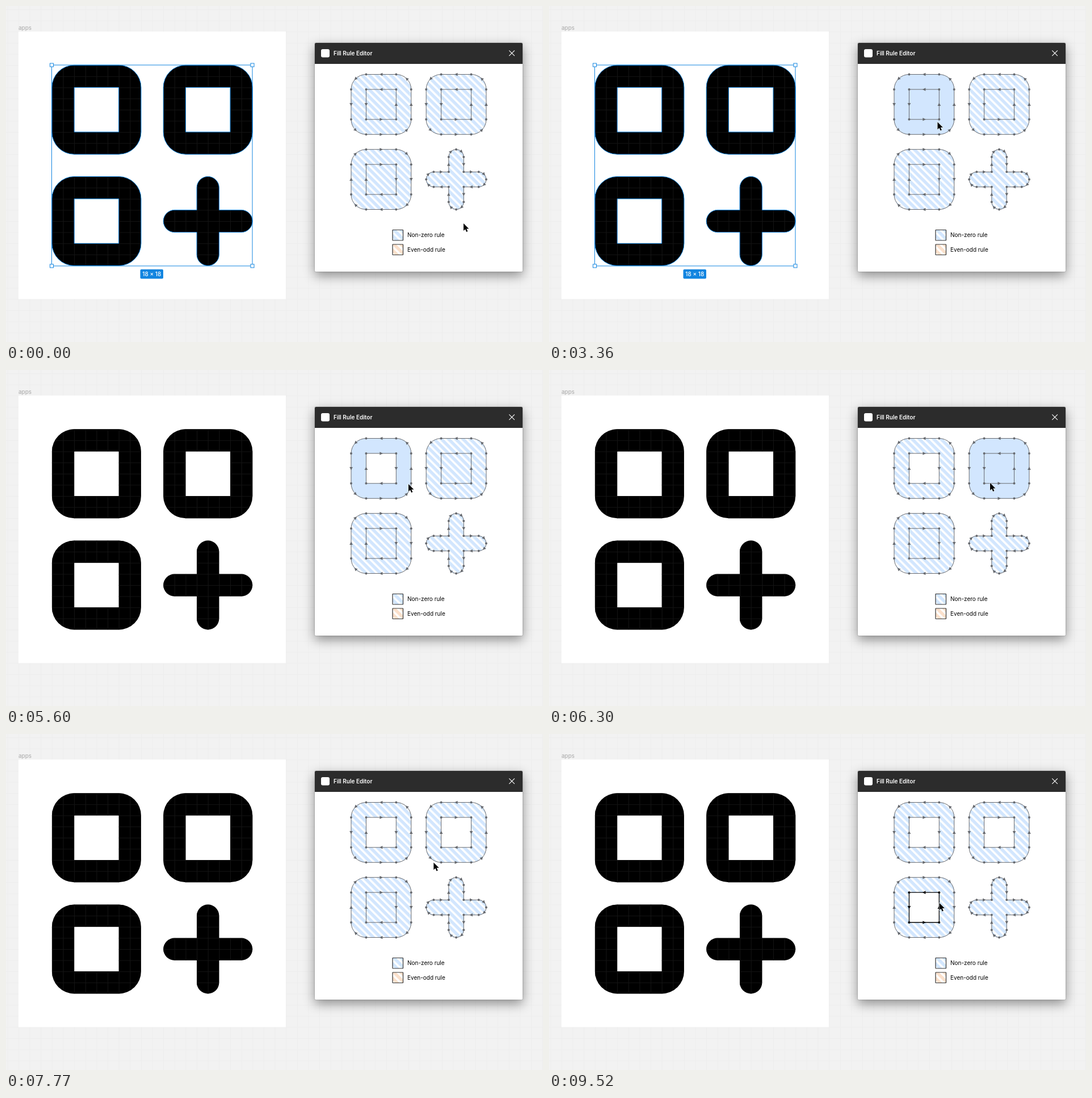
An HTML page for the animation above (9590 ms loop, 946 px wide and 592 px high).

```html
<!DOCTYPE html>
<html lang="en">
<head>
<meta charset="utf-8">
<title>Fill Rule Editor</title>
<style>
  html, body { margin: 0; width: 100%; height: 100%; overflow: hidden; background: #f2f2f2; }
  svg { display: block; width: 946px; height: 592px; }
  text { font: 10px Inter, "Liberation Sans", sans-serif; }
  .panel { filter: drop-shadow(0 0 1px rgba(0,0,0,.3)) drop-shadow(0 7px 10px rgba(0,0,0,.42)); }
  .sel { fill: none; stroke: #1285e0; stroke-width: 1; }
</style>
</head>
<body>
<svg viewBox="0 0 946 592">
  <defs>
    <pattern id="grid" x="22" y="45.3" width="19.63" height="19.63" patternUnits="userSpaceOnUse">
      <path d="M0 .5H20M.5 0V20" stroke="#ededed" fill="none"/>
    </pattern>
    <pattern id="gridDark" x="22" y="45.3" width="19.63" height="19.63" patternUnits="userSpaceOnUse">
      <path d="M0 .5H20M.5 0V20" stroke="#141414" fill="none"/>
    </pattern>
    <pattern id="blue" width="9" height="9" patternUnits="userSpaceOnUse" patternTransform="rotate(45)">
      <rect width="9" height="9" fill="#fff"/><rect width="9" height="5.5" fill="#d2e6fe"/>
    </pattern>
    <pattern id="orange" width="9" height="9" patternUnits="userSpaceOnUse" patternTransform="rotate(45)">
      <rect width="9" height="9" fill="#fff"/><rect width="9" height="5.5" fill="#fbe0cb"/>
    </pattern>
  </defs>

  <rect width="946" height="592" fill="#f2f2f2"/>
  <rect width="946" height="592" fill="url(#grid)"/>
  <text x="22" y="41.5" fill="#a9a9a9">apps</text>
  <rect x="22" y="45" width="471" height="471.5" fill="#fff"/>
  <g id="icon"></g>
  <g id="selection">
    <g id="outline" class="sel"></g>
    <rect class="sel" x="80.5" y="104" width="353.5" height="354"/>
    <g id="handles" fill="#fff" stroke="#1285e0"></g>
    <rect x="236.5" y="464" width="40.5" height="16.5" rx="2" fill="#1285e0"/>
    <text x="256.8" y="476" fill="#fff" font-weight="500" style="font-weight:500" text-anchor="middle">18 × 18</text>
  </g>

  <rect class="panel" x="544" y="65" width="366" height="403" rx="2" fill="#fff"/>
  <path d="M544 102V67q0-2 2-2H908q2 0 2 2V102Z" fill="#2c2c2c"/>
  <rect x="555" y="76" width="15" height="14.5" rx="3" fill="#fff"/>
  <text x="577" y="86.8" fill="#fff" style="font-weight:600">Fill Rule Editor</text>
  <path d="M886.3 78.3l9.6 9.6m0-9.6l-9.6 9.6" stroke="#fff" stroke-width="1.1"/>
  <g id="shapes"></g>
  <g stroke="#333" stroke-width="1.2">
    <rect x="681" y="394.5" width="18.5" height="18.5" rx=".5" fill="url(#blue)"/>
    <rect x="681" y="420" width="18.5" height="18.5" rx=".5" fill="url(#orange)"/>
  </g>
  <text x="707" y="407.3">Non-zero rule</text>
  <text x="707" y="432.8">Even-odd rule</text>
  <path id="cursor" d="M0 0V13L3 10.2 5.1 15 7.4 14 5.3 9.4H9.4Z" fill="#000" stroke="#fff" stroke-width="1" paint-order="stroke"/>
</svg>
<script>
const $ = id => document.getElementById(id);
const LOOP = 9590, STEP = 70;

// Clockwise nodes [x, y, radius of the arc that arrives here].
const OUTER = [[2,0,2],[6,0],[8,2,2],[8,6],[6,8,2],[2,8],[0,6,2],[0,2]];
const INNER = [[2,2],[6,2],[6,6],[2,6]];
const PLUS = [[3,3],[3,1],[4,0,1],[5,1,1],[5,3],[7,3],[8,4,1],[7,5,1],
              [5,5],[5,7],[4,8,1],[3,7,1],[3,5],[1,5],[0,4,1],[1,3,1]];

function segments(nodes, ox, oy, unit, cw) {
  const pts = nodes.map(([x, y, r = 0]) => ({ x: ox + x * unit, y: oy + y * unit, r: r * unit }));
  const segs = pts.map((b, i) => ({ a: pts.at(i - 1), b, r: b.r, cw }));
  return cw ? segs : segs.reverse().map(s => ({ ...s, a: s.b, b: s.a }));
}
const draw = s => s.r ? `A${s.r} ${s.r} 0 0 ${+s.cw} ${s.b.x} ${s.b.y}` : `L${s.b.x} ${s.b.y}`;
const move = s => `M${s.a.x} ${s.a.y}`;
const outlineOf = segs => move(segs[0]) + segs.map(draw).join('') + 'Z';

const probe = document.createElementNS('http://www.w3.org/2000/svg', 'path');
function arrow(s) {
  probe.setAttribute('d', move(s) + draw(s));
  const half = probe.getTotalLength() / 2;
  const p = probe.getPointAtLength(half - 1), q = probe.getPointAtLength(half + 1);
  const angle = Math.atan2(q.y - p.y, q.x - p.x) * 180 / Math.PI;
  return `<path d="M3 0L-2.5 2.8V-2.8Z" transform="translate(${(p.x + q.x) / 2} ${(p.y + q.y) / 2}) rotate(${angle})"/>`;
}
function track(segs, color, width) {
  return `<path d="${outlineOf(segs)}" fill="none" stroke="${color}" stroke-width="${width}"/><g fill="${color}">`
    + segs.map(s => `<circle cx="${s.a.x}" cy="${s.a.y}" r="2"/>` + arrow(s)).join('') + '</g>';
}

// Canvas icon on the left
const U = 19.63, LEFT = 80.9, TOP = 104.2;
const cell = i => [i % 2 * 10, (i >> 1) * 10];
const iconPaths = [0, 1, 2, 3].map(i => {
  const [cx, cy] = cell(i);
  return (i < 3 ? [OUTER, INNER] : [PLUS])
    .map(n => outlineOf(segments(n, LEFT + cx * U, TOP + cy * U, U, true))).join('');
});
const iconD = iconPaths.join('');
$('icon').innerHTML = ['#000', 'url(#gridDark)']
  .map(f => `<path d="${iconD}" fill="${f}" fill-rule="evenodd"/>`).join('');
$('outline').innerHTML = `<path d="${iconD}"/>`;
$('handles').innerHTML = [[80.5, 104], [434, 104], [80.5, 458], [434, 458]]
  .map(([x, y]) => `<rect x="${x - 3}" y="${y - 3}" width="6" height="6"/>`).join('');

// Editor shapes on the right
const FLIP = [4690, 6930, 9030];
const HOVER = [
  [0], [210, 3, 'fill'], [350], [1050, 0, 'fill'], [4060, 0, 'path'], [5530, 0, 'fill'], [5670],
  [5810, 1, 'fill'], [6440, 1, 'path'], [7490, 1, 'fill'], [7770], [8050, 2, 'fill'], [8540, 2, 'path']
];
const GRAY = '#66696e', P = 13.22;

function shape(i, hover, flipped) {
  const [cx, cy] = cell(i), x = 608 + cx * P, y = 120.5 + cy * P;
  const cw = i > 1;
  const rings = [segments(i < 3 ? OUTER : PLUS, x, y, P, cw)];
  if (i < 3) rings.push(segments(INNER, x, y, P, cw !== flipped));
  const fill = hover === 'fill' ? '#d2e6fe' : 'url(#blue)';
  return `<path d="${rings.map(outlineOf).join('')}" fill="${fill}"/>`
    + rings.map((r, k) => k && hover === 'path' ? track(r, '#000', 1.3) : track(r, GRAY, 1)).join('');
}

// Pointer path: time, x, y, easing into this point
const smooth = u => u * u * (3 - 2 * u), out = u => u * (2 - u);
const MOVES = [
  [0, 806, 383], [490, 707, 231, smooth], [770, 707, 231], [1610, 687, 201, smooth],
  [1820, 687, 204], [3010, 687, 204], [3360, 684.5, 204.5], [3920, 684.5, 204.5],
  [4130, 685, 200], [5460, 685, 200], [5600, 709, 201], [6440, 779, 199, out],
  [7420, 779, 199], [8400, 691, 293, smooth], [8470, 691, 293], [8750, 687.5, 297, smooth],
  [9450, 687.5, 297], [9520, 687.5, 297.5], [LOOP, 687.5, 297.5]
];
function pointer(t) {
  const i = MOVES.findIndex(m => m[0] > t);
  const [t0, x0, y0] = MOVES[i - 1], [t1, x1, y1, ease = u => u] = MOVES[i];
  const k = ease((t - t0) / (t1 - t0));
  return [x0 + (x1 - x0) * k, y0 + (y1 - y0) * k];
}

let shown = '';
function render(t) {
  const [x, y] = pointer(t);
  $('cursor').setAttribute('transform', `translate(${x} ${y})`);
  $('selection').style.display = t < FLIP[0] ? '' : 'none';
  const [, who, part] = HOVER.findLast(h => h[0] <= t);
  const flips = FLIP.map(f => t >= f);
  const key = [who, part, ...flips].join();
  if (key === shown) return;
  shown = key;
  $('shapes').innerHTML = [0, 1, 2, 3]
    .map(i => shape(i, i === who && part, flips[i])).join('');
}

const start = performance.now();
function tick() {
  const t = (performance.now() - start) % LOOP;
  render(Math.floor(t / STEP) * STEP);
  requestAnimationFrame(tick);
}
render(0);
requestAnimationFrame(tick);
</script>
</body>
</html>
```
